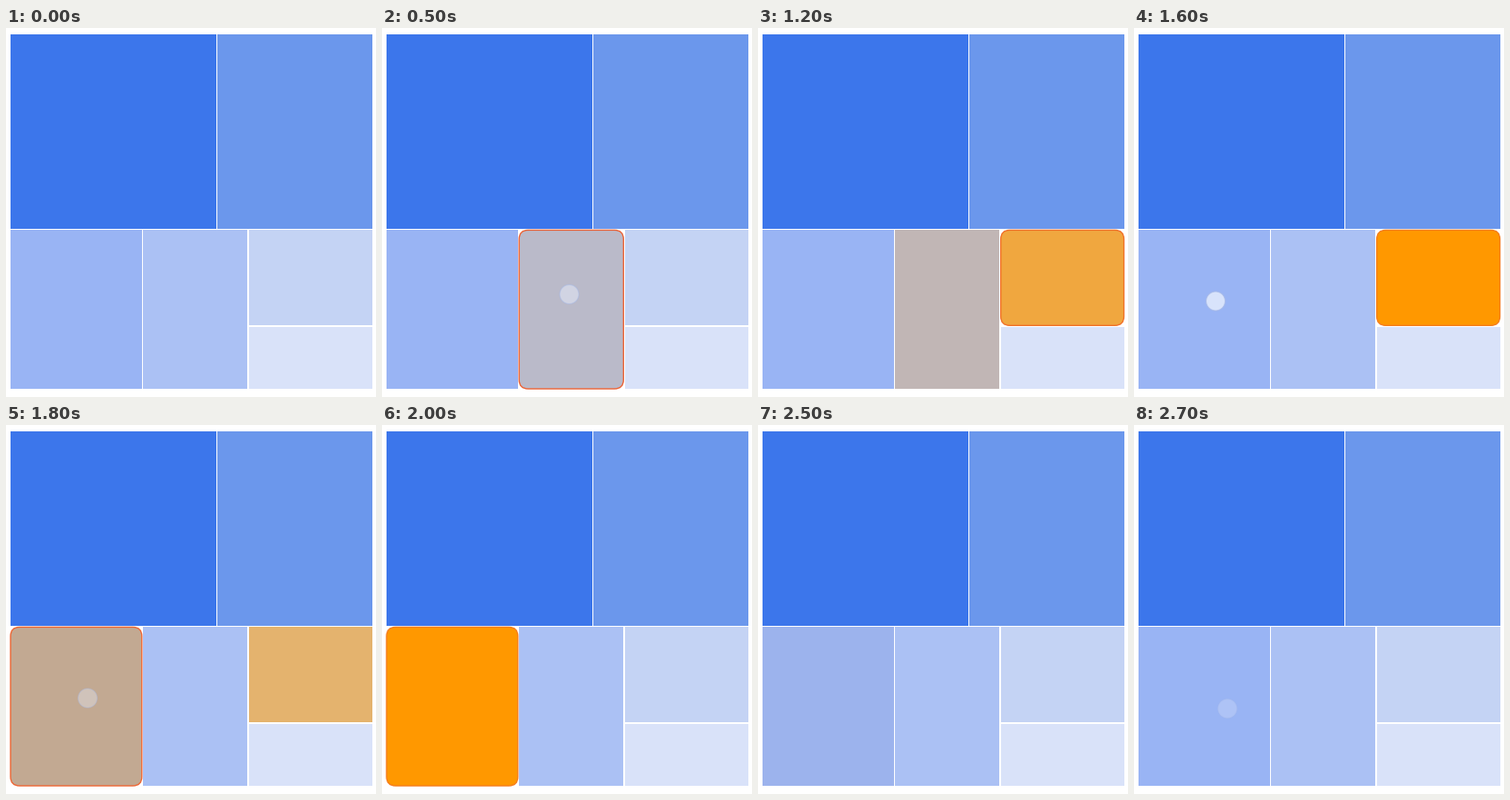
Write a matplotlib script that moves like this. It is 408 by 406 pixels and loops after 2.8 s.

```python
import matplotlib.pyplot as plt
import numpy as np
from matplotlib.animation import FuncAnimation
from matplotlib.colors import to_rgb
from matplotlib.patches import Circle, FancyBboxPatch

W, H, DPI = 408, 406, 64
STEP, FRAMES = 100, 28
ORANGE, RING = "#ff9800", "#ec6238"
GAP = 0.7      # half of the line between tiles
FADE = 300     # ms for a tile to change colour
CORNER = 10

# left, top, right, bottom, colour
TILES = [
    (5, 7, 232.5, 221.7, "#3c76eb"),
    (232.5, 7, 403.5, 221.7, "#6b97ec"),
    (5, 221.7, 150.5, 397, "#99b4f4"),
    (150.5, 221.7, 267, 397, "#abc1f4"),
    (267, 221.7, 403.5, 328, "#c4d3f4"),
    (267, 328, 403.5, 397, "#d9e2f9"),
]

# tile: (colour in, colour out, focus start, focus end), ms
SELECTED = {
    3: (420, 1000, 400, 950),
    4: (1000, 1660, 950, 1650),
    2: (1670, 2230, 1650, 2250),
}

# x, y, time of press, ms
TAPS = [
    (206.5, 293, 400),
    (314, 275.5, 1000),
    (90, 300.5, 1680),
    (103, 312, 2860),
]


def smooth(t, start):
    u = np.clip((t - start) / FADE, 0, 1)
    return u * u * (3 - 2 * u)


def mix(a, b, u):
    return (1 - u) * np.array(to_rgb(a)) + u * np.array(to_rgb(b))


def tap_alpha(t, press):
    """Fade in before the press, fade out after it."""
    return np.interp(t - press, [-200, -50, 20, 180], [0, 1, 1, 0])


fig = plt.figure(figsize=(W / DPI, H / DPI), dpi=DPI, facecolor="white")
ax = fig.add_axes([0, 0, 1, 1])
ax.set(xlim=(0, W), ylim=(H, 0))
ax.axis("off")


def inset(edge, outer, sign):
    return edge if edge in outer else edge + sign * GAP


def add_tile(left, top, right, bottom, color):
    x0, x1 = inset(left, (5,), 1), inset(right, (403.5,), -1)
    y0, y1 = inset(top, (7,), 1), inset(bottom, (397,), -1)
    tile = FancyBboxPatch((x0, y0), x1 - x0, y1 - y0, boxstyle="square,pad=0",
                          facecolor=color, edgecolor="none",
                          linewidth=1.4 * 72 / DPI)
    return ax.add_patch(tile)


tiles = [add_tile(*spec) for spec in TILES]
dot = ax.add_patch(Circle((0, 0), 10.5, facecolor="#e8effd",
                          edgecolor="#a6b9e8", linewidth=1.1 * 72 / DPI,
                          zorder=5))


def draw(frame):
    t = frame * STEP
    for i, (rise, fall, focus, blur) in SELECTED.items():
        fill = smooth(t, rise) - smooth(t, fall)
        tile = tiles[i]
        tile.set_facecolor(mix(TILES[i][4], ORANGE, fill))
        if focus <= t < blur:
            tile.set_boxstyle("round", pad=0, rounding_size=CORNER)
            tile.set_edgecolor(mix(RING, ORANGE, 0.5 * fill ** 2))
        else:
            tile.set_boxstyle("square", pad=0)
            tile.set_edgecolor("none")

    x, y, press = min(TAPS, key=lambda tap: abs(t - tap[2]))
    dot.center = x, y
    dot.set_alpha(tap_alpha(t, press))
    return [*tiles, dot]


anim = FuncAnimation(fig, draw, frames=FRAMES, interval=STEP,
                     repeat=True, repeat_delay=0, blit=False)
plt.show()
```
